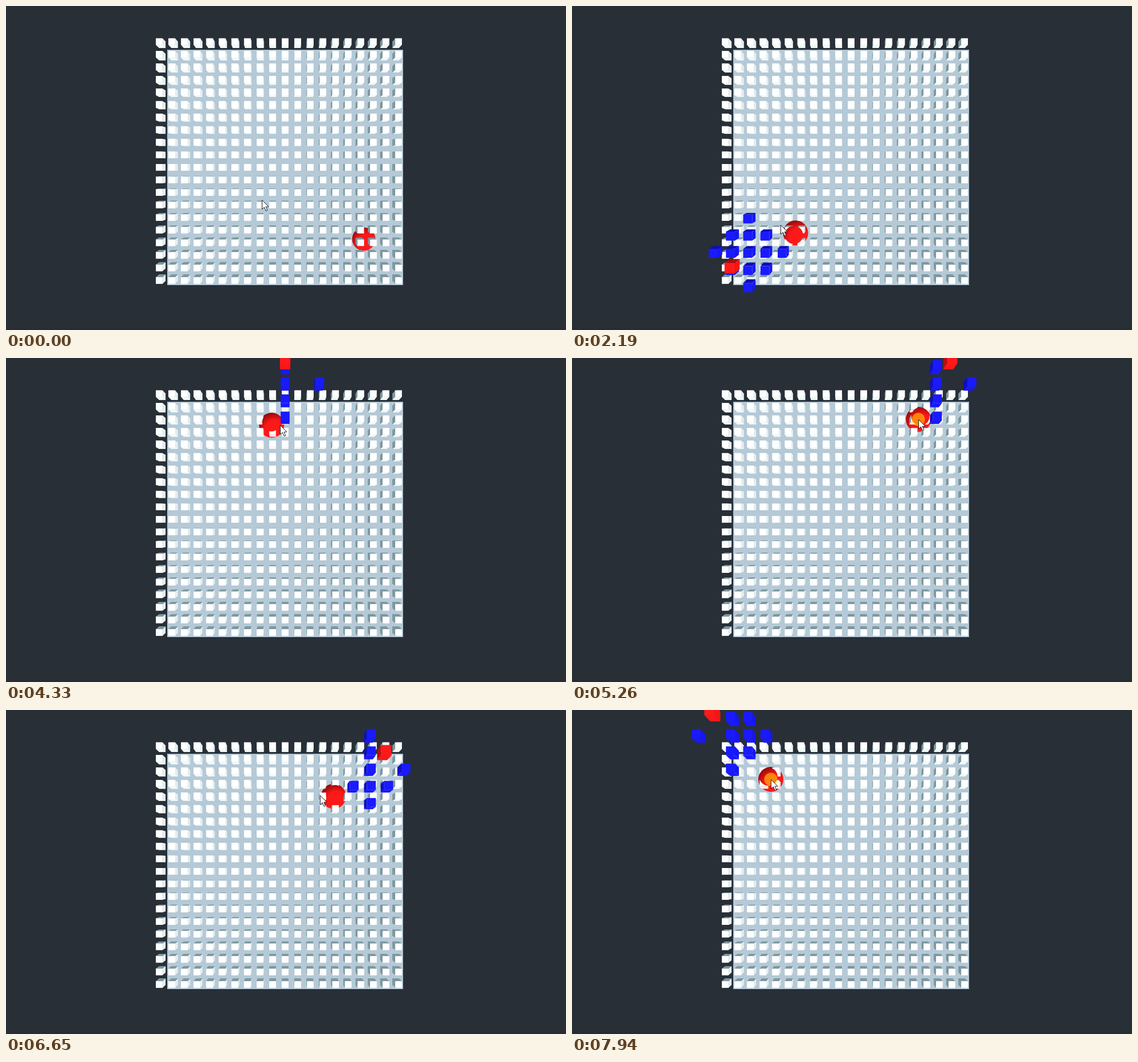
An HTML page with a canvas for the animation above (8000 ms loop, 983 px wide and 570 px high).

```html
<!DOCTYPE html>
<html lang="en">
<head>
<meta charset="utf-8">
<title>Cube grid</title>
<style>
  html, body { margin: 0; width: 100%; height: 100%; overflow: hidden; background: #282f37; }
  canvas { display: block; }
</style>
</head>
<body>
<canvas id="stage" width="983" height="570"></canvas>
<script>
const W = 983, H = 570, CX = 490, CY = 283.8;
const LOOP = 8000, START = 590, STEP = 76.56, LAST = 96;
const HALF = 0.26, FOCAL = 440;  // half a cube in cells, camera focal length in pixels
const PICK_PITCH = 21.5, PICK_EVERY = 4, FIRST_PICK = 5;
const BALL_START = { x: 628, y: 410 }, BALL_LAG = 1.3, BALL_JOIN = 8;

// Scale is pixels per cell at the face nearest the camera; the far face follows from the perspective.
function layer(scale, top, left, right, up, down) {
  return { near: scale, far: scale / (1 + scale * 2 * HALF / FOCAL), top, left, right, up, down };
}
const WHITE = layer(22.12, '#fff', '#7d979f', '#e3edf1', '#7d979f', '#f1f9f7');
const BLUE = layer(30.27, '#1a1aff', '#0e0ec4', '#1616f6', '#0c0cb8', '#1818fc');
const RED = layer(35.5, '#ff1a1a', '#b80e0e', '#f21616', '#ad0c0c', '#fa1818');

// Pointer route as [step, x, y]; a repeated place is a press.
const ROUTE = [[-1, 449, 341], [7, 605, 440], [16, 468, 440], [21, 366, 385],
  [31, 342, 182], [33, 342, 182], [37, 345, 120], [49, 481, 118],
  [59, 608, 108], [61, 608, 108], [67, 645, 130], [77, 588, 153],
  [79, 551, 150], [87, 479, 115], [93, 349, 122], [LAST, 349, 122]];
const CLOSED_COLUMNS = new Set([-8, -2, -1, 1, 3, 4, 6, 8]);

const ctx = document.getElementById('stage').getContext('2d');
const clamp = (v, lo, hi) => Math.max(lo, Math.min(hi, v));
const mix = (a, b, f) => a + (b - a) * f;

function pointer(step) {
  const s = clamp(step, -1, LAST);
  const i = Math.max(1, ROUTE.findIndex(p => p[0] >= s));
  const [t0, x0, y0] = ROUTE[i - 1], [t1, x1, y1] = ROUTE[i];
  const f = (s - t0) / (t1 - t0);
  return { x: mix(x0, x1, f), y: mix(y0, y1, f) };
}

function pickedCell(step) {
  const p = pointer(step - (step - 1) % PICK_EVERY);
  return [Math.round((p.x - CX) / PICK_PITCH), Math.round((p.y - CY) / PICK_PITCH)];
}

function poly(g, color, points) {
  g.fillStyle = color;
  g.beginPath();
  points.forEach(([x, y]) => g.lineTo(x, y));
  g.fill();
}

function cube(g, col, row, look) {
  const corners = k => [[-1, -1], [1, -1], [1, 1], [-1, 1]]
    .map(([i, j]) => [CX + (col + i * HALF) * k, CY + (row + j * HALF) * k]);
  const n = corners(look.near), f = corners(look.far);
  const side = (color, a, b) => poly(g, color, [n[a], n[b], f[b], f[a]]);
  if (col > 0) side(look.left, 0, 3);
  if (col < 0) side(look.right, 1, 2);
  if (row > 0) side(look.up, 0, 1);
  if (row < 0) side(look.down, 3, 2);
  poly(g, look.top, n);
}

function whiteGrid() {
  const sheet = document.createElement('canvas');
  sheet.width = W;
  sheet.height = H;
  const g = sheet.getContext('2d');
  for (let row = -10; row < 10; row++)
    for (let col = -10; col < 10; col++) cube(g, col, row, WHITE);
  return sheet;
}
const grid = whiteGrid();

function circle(x, y, r) {
  ctx.moveTo(x + r, y);
  ctx.arc(x, y, r, 0, Math.PI * 2);
}

// The ball rises as it joins the pointer; its crown clears the cubes, which poke through around it.
function drawBall(step) {
  const rise = clamp((step + 1) / BALL_JOIN, 0, 1);
  const goal = pointer(step - BALL_LAG);
  const x = mix(BALL_START.x, goal.x, rise), y = mix(BALL_START.y, goal.y, rise);
  const radius = 20.5 + 1.5 * rise;
  const shade = ctx.createRadialGradient(x + 6, y + 9, 0, x + 6, y + 9, 33);
  shade.addColorStop(0, '#ff1a1a');
  shade.addColorStop(0.55, '#fb1818');
  shade.addColorStop(1, '#8a0808');
  ctx.fillStyle = shade;
  ctx.beginPath();
  circle(x, y, radius);
  ctx.fill();
  ctx.save();
  ctx.beginPath();
  ctx.rect(0, 0, W, H);
  circle(x + (x - CX) * 0.03, y + (y - CY) * 0.03, 16 * rise);
  ctx.clip('evenodd');
  ctx.drawImage(grid, 0, 0);
  ctx.restore();
}

const isOpen = (col, row) => row > -6 || !CLOSED_COLUMNS.has(col);

function drawRange(col, row) {
  for (let dy = -2; dy <= 2; dy++) {
    const reach = 2 - Math.abs(dy);
    for (let dx = -reach; dx <= reach; dx++)
      if (isOpen(col + dx, row + dy)) cube(ctx, col + dx, row + dy, BLUE);
  }
  cube(ctx, col, row, RED);
}

function drawPointer(step) {
  const { x, y } = pointer(step), before = pointer(step - 1);
  if (step >= 0 && x === before.x && y === before.y) {
    ctx.fillStyle = 'rgba(255,240,0,0.5)';
    ctx.beginPath();
    circle(x, y, 11.5);
    ctx.fill();
  }
  ctx.save();
  ctx.translate(x + 0.5, y + 0.5);
  poly(ctx, '#fff', [[0, 0], [0, 16], [3.8, 12.5], [6.8, 19], [9.3, 18], [6.6, 11.8], [11.5, 11.5]]);
  ctx.closePath();
  ctx.strokeStyle = '#222';
  ctx.lineWidth = 1;
  ctx.stroke();
  ctx.restore();
}

function draw(time) {
  const step = clamp(Math.floor((time - START) / STEP + 0.17), -1, LAST);
  ctx.fillStyle = '#282f37';
  ctx.fillRect(0, 0, W, H);
  ctx.fillStyle = '#2a2b35';
  ctx.fillRect(0, 567, W, 3);
  ctx.fillStyle = '#b5c9d6';
  ctx.fillRect(283, 77, 414, 414);
  ctx.drawImage(grid, 0, 0);
  drawBall(step);
  if (step >= FIRST_PICK) drawRange(...pickedCell(step));
  drawPointer(step);
}

function frame(now) {
  draw(now % LOOP);
  requestAnimationFrame(frame);
}
draw(0);
requestAnimationFrame(frame);
</script>
</body>
</html>
```
